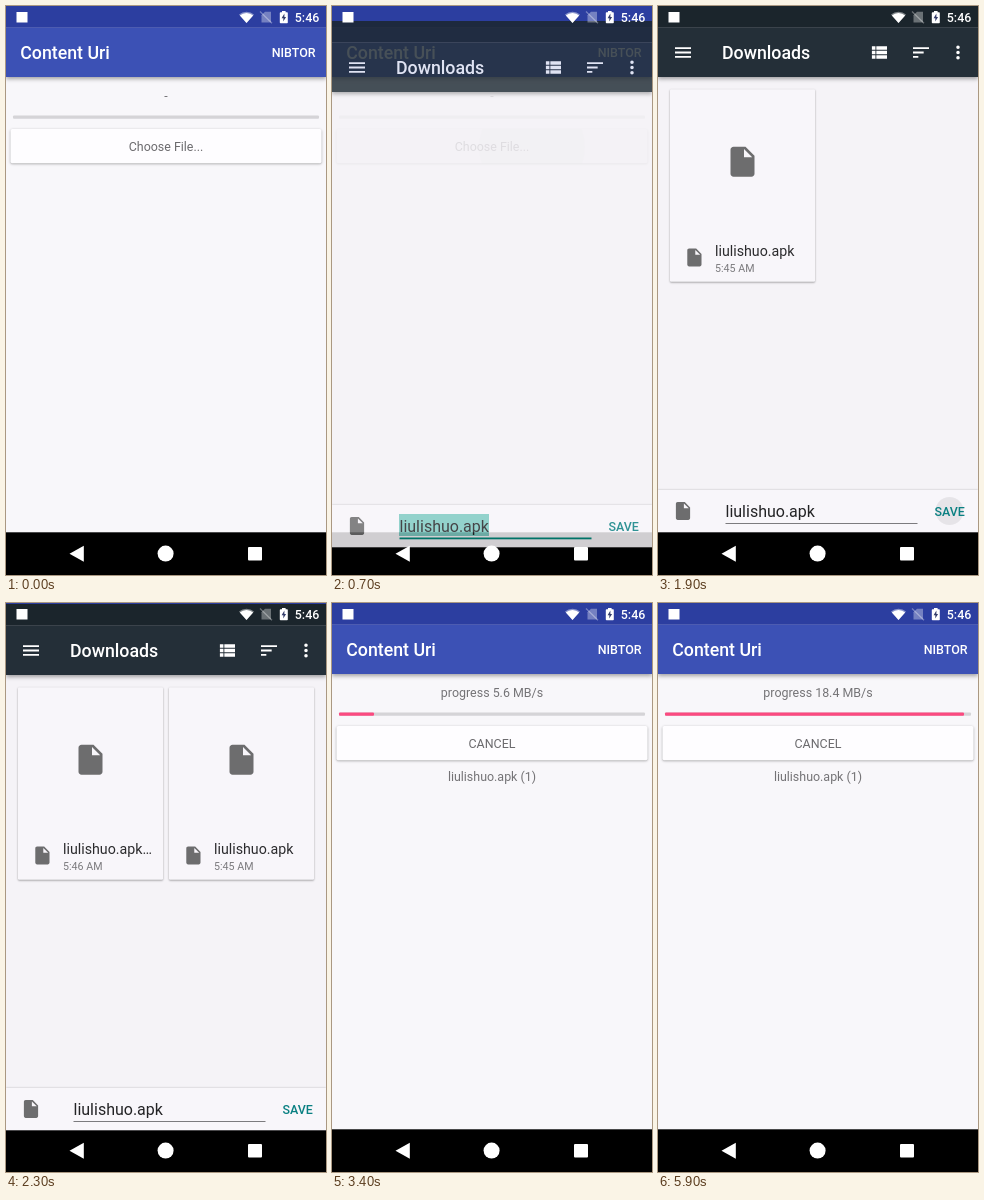
Animation, 320 px wide and 569 px high, one loop 6000 ms. Source, as an HTML page with a canvas:

```html
<!DOCTYPE html>
<html lang="en">
<head>
<meta charset="utf-8">
<title>Content Uri</title>
<style>
html, body { margin: 0; width: 100%; height: 100%; overflow: hidden; background: #000; }
canvas { display: block; width: 100vw; height: 100vh; }
</style>
</head>
<body>
<canvas id="stage"></canvas>
<script>
const W = 320, H = 569, LOOP = 6000, STEP = 100;
const DP = 320 / 360;
const NAV_TOP = 526.3, BAR_TOP = 21.3, BAR_END = 71;
const stage = document.getElementById('stage');
const layer = document.createElement('canvas');
const ratio = window.devicePixelRatio || 1;
const screen2d = prepare(stage), layer2d = prepare(layer);
let c = screen2d;

const ICON = {
  menu: new Path2D('M3 18h18v-2H3v2zm0-5h18v-2H3v2zm0-7v2h18V6H3z'),
  list: new Path2D('M4 14h4v-4H4v4zm0 5h4v-4H4v4zM4 9h4V5H4v4zm5 5h12v-4H9v4zm0 5h12v-4H9v4zM9 5v4h12V5H9z'),
  sort: new Path2D('M3 18h6v-2H3v2zM3 6v2h18V6H3zm0 7h12v-2H3v2z'),
  more: new Path2D('M14 6a2 2 0 1 1-4 0a2 2 0 1 1 4 0zm0 6a2 2 0 1 1-4 0a2 2 0 1 1 4 0zm0 6a2 2 0 1 1-4 0a2 2 0 1 1 4 0z'),
  file: new Path2D('M6 2c-1.1 0-2 .9-2 2v16c0 1.1.9 2 2 2h12c1.1 0 2-.9 2-2V8l-6-6H6zm7 7V3.5L18.5 9H13z')
};

// [time, speed, end of the bar]
const PROGRESS = [
  [2500, '0 B/s', 7], [3000, '3.2 MB/s', 19], [3300, '5.6 MB/s', 42],
  [3600, '7.7 MB/s', 68], [3900, '9.4 MB/s', 98], [4500, '11.0 MB/s', 130],
  [4800, '12.6 MB/s', 160], [5300, '14.9 MB/s', 215],
  [5600, '16.7 MB/s', 262], [5800, '18.4 MB/s', 306]
];

function prepare(canvas) {
  canvas.width = W * ratio;
  canvas.height = H * ratio;
  const ctx = canvas.getContext('2d');
  ctx.scale(ratio, ratio);
  return ctx;
}

function rect(x, y, w, h, color) {
  c.fillStyle = color;
  c.fillRect(x, y, w, h);
}

function round(x, y, w, h, r, color) {
  c.fillStyle = color;
  c.beginPath();
  c.roundRect(x, y, w, h, r);
  c.fill();
}

function disc(x, y, r, color) {
  c.fillStyle = color;
  c.beginPath();
  c.arc(x, y, r, 0, Math.PI * 2);
  c.fill();
}

function poly(points, color) {
  c.fillStyle = color;
  c.beginPath();
  points.forEach(([x, y]) => c.lineTo(x, y));
  c.fill();
}

function text(str, x, y, sp, color, align = 'left', weight = 400) {
  c.font = `${weight} ${sp * DP}px Roboto, "Noto Sans", sans-serif`;
  c.textAlign = align;
  c.fillStyle = color;
  c.fillText(str, x, y);
}

function icon(name, cx, cy, color, scale = DP) {
  c.save();
  c.translate(cx - 12 * scale, cy - 12 * scale);
  c.scale(scale, scale);
  c.fillStyle = color;
  c.fill(ICON[name]);
  c.restore();
}

function shadowed(blur, dy, alpha, draw) {
  c.save();
  c.shadowColor = `rgba(0,0,0,${alpha})`;
  c.shadowBlur = blur * ratio;
  c.shadowOffsetY = dy * ratio;
  draw();
  c.restore();
}

function topBar(status, bar) {
  shadowed(4, 1.5, 0.35, () => rect(0, BAR_TOP, W, BAR_END - BAR_TOP, bar));
  rect(0, 0, W, BAR_TOP + 0.2, status);
}

function ripple(x, y, r, alpha) {
  disc(x, y, r, `rgba(0,0,0,${alpha})`);
}

function mainScreen(t) {
  rect(0, 0, W, H, '#f8f7fa');
  topBar('#2c3ea0', '#3c51b5');
  text('Content Uri', 14.2, 53, 20, '#fff', 'left', 500);
  text('NIBTOR', 309.5, 51, 14, '#fff', 'right', 500);

  const state = PROGRESS.filter(p => p[0] <= t).pop();
  text(state ? 'progress ' + state[1] : '-', 160, 93.5, 14, '#747376', 'center');
  round(7, 109.4, 306, 3.4, 1, '#d5d4d7');
  if (state && state[2] > 7) round(7, 109.4, state[2] - 7, 3.4, 1, '#fb4a80');

  const pressed = t >= 500 && t < 1100;
  shadowed(2.5, 0.8, 0.35, () => round(4.5, 123, 311, 34.2, 1.8, pressed ? '#f0eff2' : '#fefdff'));
  if (pressed) {
    c.save();
    c.beginPath();
    c.roundRect(4.5, 123, 311, 34.2, 1.8);
    c.clip();
    ripple(200, 141, t < 600 ? 30 : 53, 0.035);
    c.restore();
  }
  text(state ? 'CANCEL' : 'Choose File...', 160, 145, 14, '#6c6b6e', 'center');
  if (state) text('liulishuo.apk (1)', 160, 178, 14, '#747376', 'center');
  rect(0, NAV_TOP, W, H - NAV_TOP, '#000');
}

function card(x, name, time) {
  shadowed(2, 0.6, 0.4, () => round(x, 83.3, 145, 192.5, 1, '#f8f6fa'));
  icon('file', x + 72.5, 155.7, '#6d6d6e', 1.5);
  icon('file', x + 24.4, 251.5, '#6d6d6e');
  text(name, x + 45, 249.8, 16, '#2b2b2d');
  text(time, x + 45, 265.8, 12, '#7b7a7d');
}

function picker(t) {
  rect(0, 0, W, H, '#f5f3f7');
  if (t >= 2100) {
    card(12, 'liulishuo.apk…', '5:46 AM');
    card(163, 'liulishuo.apk', '5:45 AM');
  } else if (t >= 800) {
    card(12, 'liulishuo.apk', '5:45 AM');
  }
  topBar('#1b252c', '#242f38');
  icon('menu', 25, 46.5, '#fff');
  text('Downloads', 64, 53, 20, '#fff', 'left', 500);
  icon('list', 221, 46.5, '#fff');
  icon('sort', 263, 46.5, '#fff');
  icon('more', 300, 46.5, '#fff');

  shadowed(2, -0.5, 0.25, () => rect(0, 484, W, 43, '#f8f6fa'));
  const focused = t < 900;
  icon('file', 25, 505, '#6d6d6e');
  if (focused) rect(67, 493, 90, 22, '#80cbc4');
  text('liulishuo.apk', 67.5, 510.8, 18, '#232325');
  rect(67.5, focused ? 516.5 : 517, 192, focused ? 1.8 : 1, focused ? '#00897b' : '#7c7b7e');
  if (t >= 1900 && t < 2200) ripple(291.5, 505, 14 + (t - 1900) / 20, 0.07);
  text('SAVE', 276.5, 510, 14, '#0a8082', 'left', 500);
  rect(0, NAV_TOP, W, H - NAV_TOP, '#000');
}

// Offset and opacity of the sliding picker window
function slide(t) {
  if (t < 600 || t >= 2500) return null;
  if (t < 1100) {
    const rest = 1 - (t - 600) / 400;
    return { y: Math.round(36 * Math.max(0, rest) ** 3), alpha: Math.min(1, 0.34 + (t - 600) / 200) };
  }
  if (t < 2300) return { y: 0, alpha: 1 };
  return t < 2400 ? { y: 1, alpha: 1 } : { y: 30, alpha: 0.35 };
}

function fan(r, color) {
  c.fillStyle = color;
  c.beginPath();
  c.moveTo(240.5, 17);
  c.arc(240.5, 17, r, -Math.PI * 0.73, -Math.PI * 0.27);
  c.fill();
}

function systemIcons() {
  rect(10.5, 6, 11, 10.5, '#fff');
  fan(11.3, 'rgba(255,255,255,.45)');
  fan(10, '#fff');

  c.save();
  c.globalAlpha = 0.35;
  poly([[259, 5.8], [265, 5.8], [265, 16.5], [255.5, 16.5], [255.5, 9.3]], '#fff');
  c.strokeStyle = '#fff';
  c.lineWidth = 1.2;
  c.beginPath();
  c.moveTo(254, 5.5);
  c.lineTo(266, 17.2);
  c.stroke();
  c.restore();

  rect(276, 5, 3.6, 2, '#fff');
  round(273.8, 6.2, 8, 11, 0.8, '#fff');
  poly([[278.4, 7.6], [275.6, 12.3], [277.4, 12.3], [277.2, 15.6], [280.1, 10.9], [278.4, 10.9]], '#333c6a');
  text('5:46', 313.3, 15.8, 14, '#fff', 'right', 500);

  poly([[63.5, 547.8], [77.8, 539.8], [77.8, 555.8]], '#fff');
  disc(159.6, 547.6, 8, '#fff');
  round(242, 541, 14, 13.6, 1, '#fff');
}

function draw(now) {
  const t = Math.floor((now % LOOP) / STEP) * STEP;
  c = screen2d;
  mainScreen(t);
  const move = slide(t);
  if (move) {
    c = layer2d;
    picker(t);
    c = screen2d;
    c.globalAlpha = move.alpha;
    c.drawImage(layer, 0, move.y, W, H);
    c.globalAlpha = 1;
  }
  systemIcons();
}

const start = performance.now();
function tick() {
  draw(performance.now() - start);
  requestAnimationFrame(tick);
}
tick();
</script>
</body>
</html>
```
